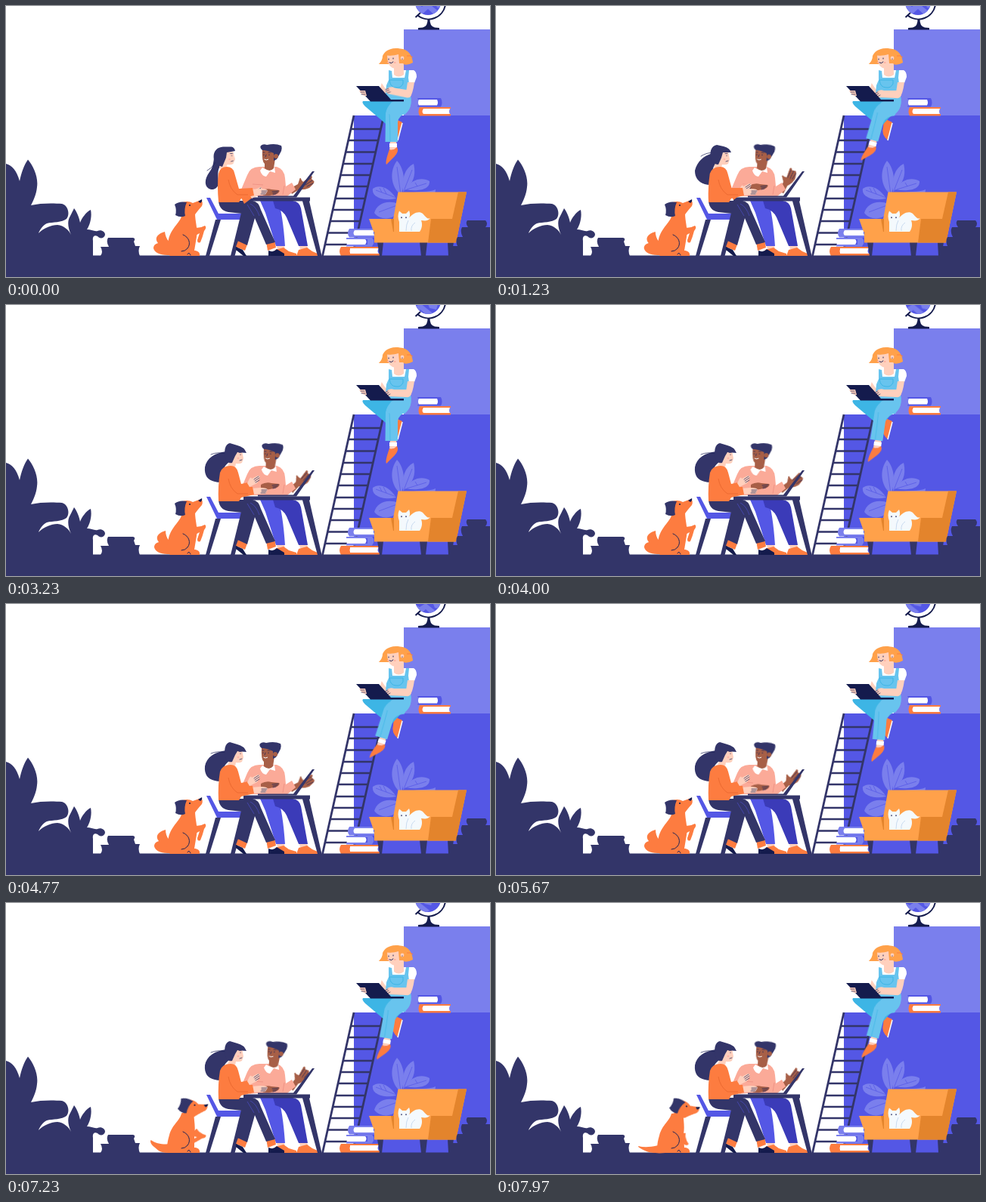
An HTML page for the animation above (8000 ms loop, 640 px wide and 359 px high).

```html
<!DOCTYPE html>
<html lang="en">
<head>
<meta charset="utf-8">
<title>Working together</title>
<style>
html, body { margin: 0; width: 100%; height: 100%; overflow: hidden; background: #fff; }
svg { display: block; width: 100%; height: 100%; }
.navy { fill: #333569; } .ink { fill: #141b4d; }
.blue { fill: #5457e5; } .lilac { fill: #7a7fed; } .indigo { fill: #3b3bb8; }
.orange { fill: #fd7c40; } .amber { fill: #ffa14a; } .rust { fill: #e3842c; }
.skin { fill: #ffd0bd; } .brown { fill: #a75f47; } .rose { fill: #fbaa98; }
.denim { fill: #68c4ee; } .deep { fill: #3db5e5; } .white { fill: #fff; }
.line { fill: none; stroke: #1d2358; stroke-width: 1; stroke-linecap: round; stroke-linejoin: round; }
.thin { stroke-width: .7; } .bold { stroke-width: 1.4; }
.move { animation: 8s ease-in-out infinite; }
#leg { transform-origin: 513px 133px; animation-name: leg; }
#typing { transform-origin: 535px 118px; animation-name: typing; }
#manHead { transform-origin: 346px 216px; animation-name: man-head; }
#collar { animation-name: collar; }
#wave { transform-origin: 378px 245px; animation-name: wave; }
#manHand { animation-name: man-hand; }
#ponytail { animation-name: ponytail; }
#crown { animation-name: crown; }
#womanFace { animation-name: woman-face; }
#strand { animation-name: strand; }
#sweater { animation-name: sweater; }
#gesture { animation-name: gesture; }
#dogHead { transform-origin: 236px 272px; animation-name: dog-head; }
#tail { animation-name: tail; }
#paw { transform-origin: 248px 300px; animation-name: paw; }
#dogBody { animation-name: dog-body; }
#continents { animation-name: spin; }

@keyframes leg {
  0%, 40.4% { transform: rotate(0deg); }
  20.2% { transform: rotate(17.6deg); }
  60% { transform: rotate(17deg); }
  77% { transform: rotate(0deg); }
  100% { transform: rotate(14.8deg); }
}
@keyframes typing {
  0% { transform: rotate(9deg); }
  5%, 100% { transform: none; }
}
@keyframes man-head {
  0% { transform: none; }
  15.4%, 25.4% { transform: translate(3px, 0) rotate(3deg); }
  40.4% { transform: translate(1.5px, 0) rotate(1deg); }
  59.6% { transform: translate(-1px, 0); }
  80.9% { transform: translate(7px, 0) rotate(5deg); }
  100% { transform: translate(4px, 0) rotate(3deg); }
}
@keyframes collar {
  0%, 59.6% { transform: none; }
  15.4%, 25.4% { transform: translate(3px, 0); }
  80.9% { transform: translate(6px, 0); }
  100% { transform: translate(4px, 0); }
}
@keyframes wave {
  0% { transform: none; }
  15.4%, 25.4% { transform: rotate(-32deg); }
  40.4% { transform: rotate(-15deg); }
  59.6% { transform: rotate(2deg); }
  80.9% { transform: rotate(-28deg); }
  100% { transform: rotate(-17deg); }
}
@keyframes man-hand {
  0% { transform: translate(0, 7px); }
  15.4% { transform: translate(-2px, 0); }
  25.4%, 62% { transform: none; }
  80%, 100% { transform: translate(0, 7px); }
}
@keyframes ponytail {
  0% { d: path("M278 193C273 203 276 211 269 220C263 228 262 237 267 241C272 245 279 243 281 236C281 226 278 217 285 210L292 195Z"); }
  15.4% { d: path("M286 195C274 199 266 206 263 218C263 227 267 233 276 236C284 238 292 237 290 230C285 223 285 215 291 208L298 194Z"); }
  22%, 100% { d: path("M291 194C276 196 265 203 263 215C262 226 267 232 276 234C284 236 291 235 290 229C286 222 286 215 295 208L302 193Z"); }
}
@keyframes crown {
  0% { d: path("M275 204C273 194 278 187 287 186.5L298 186.5Q302 187 303 192L292 194L291 201L286 213Q278 211 275 204Z"); }
  15.4% { d: path("M285 206C281 193 285 185 292 184L301 186Q309 188 311 194L300 194L298 201L294 210Q289 210 285 206Z"); }
  22%, 100% { d: path("M291 206C287 193 290 184 296 183L306 186Q315 188 318 196L306 195L303 200L299 209Q294 210 291 206Z"); }
}
@keyframes woman-face {
  0% { transform: translate(-11.5px, 0); }
  15.4% { transform: translate(-5px, 0); }
  22%, 100% { transform: none; }
}
@keyframes strand {
  0% { d: path("M279 203Q276 212 266 218"); }
  15.4% { d: path("M289 194Q278 194 271 199"); }
  22%, 100% { d: path("M291 197Q280 194 271 198"); }
}
@keyframes sweater {
  0% { d: path("M281 259Q279 239 281 222Q283 213 292 213Q300 213 302 221L308 242L326 241L328 251L311 255L308 260H281Z"); }
  20%, 100% { d: path("M281 259Q280 240 283 222Q286 213 297 213Q305 213 307 222L312 241L326 241L328 251L311 255L308 260H281Z"); }
}
@keyframes gesture {
  0% { transform: translate(3px, 14px); }
  15.4% { transform: translate(2px, 9px); }
  25.4%, 100% { transform: none; }
}
@keyframes dog-head {
  0%, 73% { transform: none; }
  80.9% { transform: translate(2px, 0) rotate(16deg); }
  100% { transform: translate(6px, 1px) rotate(29deg); }
}
@keyframes tail {
  0% { d: path("M224 329C207 332 197 328 195 321C195 316 199 315 201 314C195 307 202 301 210 299C211 308 216 316 226 318Z"); }
  25%, 73% { d: path("M224 329C207 332 198 328 196 321C196 316 200 315 202 314C196 307 203 301 211 299C211 308 216 316 226 318Z"); }
  80.9% { d: path("M224 329C212 332 206 330 203 326C201 323 200 321 198 319C193 313 193 308 195 306C201 316 214 319 226 318Z"); }
  100% { d: path("M224 331C214 332 204 331 199 329C196 328 193 326 191 325C189 324 188 323 188 322C200 325 214 322 226 317Z"); }
}
@keyframes paw {
  0%, 78% { transform: none; }
  82% { transform: rotate(12deg) translate(0, 2px); }
  100% { transform: rotate(82deg) translate(5px, 5px); }
}
@keyframes dog-body {
  0%, 73% { d: path("M233 276C230 288 219 293 215 309C212 319 212 328 217 331L256 331C257 326 253 324 249 324L252 306C254 296 250 286 250 274Z"); }
  100% { d: path("M232 279C229 290 220 293 216 308C213 318 212 327 215 331L256 331C257 326 253 324 249 324L248 306C250 294 247 286 248 277Z"); }
}
@keyframes spin {
  0%, 21% { transform: none; }
  40% { transform: translate(-10px, 2px); }
  60% { transform: translate(-3px, 3px); }
  81% { transform: translate(-30px, -4px); }
  100% { transform: translate(-3px, 2px); }
}
</style>
</head>
<body>
<svg viewBox="0 0 640 359" preserveAspectRatio="none">
  <defs>
    <clipPath id="sphere"><circle cx="558" cy="-5" r="17"/></clipPath>
  </defs>

  <!-- blocks -->
  <path class="lilac" d="M526 31H640V146H526Z"/>
  <path class="blue" d="M460 145H640V331H460Z"/>

  <!-- globe -->
  <circle class="blue" cx="558" cy="-5" r="17"/>
  <g clip-path="url(#sphere)"><path id="continents" class="move lilac" d="M541 -4L550 1L558 -4L577 11L570 15L558 4L549 12L543 8ZM566 -8L582 -7L579 4L570 2Z"/></g>
  <path fill="none" stroke="#141b4d" stroke-width="2" d="M541.500 15L548 9M544 12A22.500 22.500 0 0 0 581 -2"/>
  <path class="ink" d="M557.500 17H560.500Q560 27 567 28.500L573 29V31.500H545V29L551 28.500Q558 27 557.500 17Z"/>

  <!-- books on the block -->
  <path class="blue" d="M544 122H575Q578 128 575 133.500H544L545 131.500H570V124H545Z"/>
  <path class="white" d="M546 124H570Q572 128 570 131.500H546Q544 128 546 124Z"/>
  <path class="orange" d="M547 134H588V136H558V143H588V145.500H547Q544 140 547 134Z"/>
  <path class="white" d="M552 136H587Q585 140 587 143H552Q549 140 552 136Z"/>

  <!-- leafy plant -->
  <g class="lilac">
    <path d="M522 250C508 239 507 218 517 205C528 217 528 237 522 250Z"/>
    <path d="M525 246C523 229 527 215 539 209C543 226 537 237 525 246Z"/>
    <path d="M528 243C535 230 550 226 560 232C561 244 543 246 528 243Z"/>
    <path d="M516 255C506 239 492 236 485 242C483 253 499 259 516 255Z"/>
    <path d="M519 262C503 256 490 263 487 274C494 284 512 284 518 273Z"/>
    <path d="M530 249C545 244 558 248 568 243L566 260H530Z"/>
  </g>
  <path fill="none" stroke="#5457e5" stroke-width=".7" d="M517 213L522 250M537 217L526 245M556 235L530 243M489 244L516 254M493 273L517 264M494 241l3 6M499 241l4 8M541 234l3 5"/>

  <!-- ladder -->
  <path fill="none" stroke="#333569" stroke-width="2.800" d="M460 145L418.500 331M498 152L458 331"/>
  <path fill="none" stroke="#333569" stroke-width="2.300" d="M456 163H495M453 178H492M449 193.500H489M446 209H485M442 224H482M439 239H478M435 255H475M432 270H471M428 285H468M425 300.500H464M421 316H461"/>

  <!-- books on the floor -->
  <path class="lilac" d="M454 295H488V297H464V304H488V306.500H454Q450 301 454 295ZM450 307H484Q489 312 484 318.500H450V316H478V309H450Z"/>
  <path class="white" d="M461 297H487Q485 300 487 304H461Q458 301 461 297ZM451 309H475Q478 312 475 316H451Q449 312 451 309Z"/>
  <path class="orange" d="M443 319H494V321H455V328H494V331H443Q439 325 443 319Z"/>
  <path class="white" d="M456 321H493Q490 325 493 328H456Q453 325 456 321Z"/>

  <!-- armchair and cat -->
  <path class="navy" d="M491 313H499L497 331H494ZM547 313H557L555 331H549ZM584 313H592L589 331H585Z"/>
  <path class="amber" d="M518.500 246.500H609L595 313.500H487V299H509Z"/>
  <path class="rust" d="M609 246.500L595 313.500H558L562 282H590L598 246.500ZM509 282L513 282L513 299H507Z"/>
  <path class="amber" d="M480 282H509L512 299H486Z"/>
  <path fill="#f4f9fd" d="M520 271.500L524 275H529L533 271C535 276 534 280 532 282C538 274 546 271 551 275C555 279 557 283 561 281C557 286 552 284 549 284C551 289 550 295 547 299H520V286C518 281 518 276 520 271.500Z"/>
  <path fill="none" stroke="#c9dbf0" d="M532 284Q529 289 529 298M541 287Q535 291 536 298"/>
  <path class="line bold" d="M523 280v.5M529 280v.5"/>

  <!-- girl on the block -->
  <path class="orange" d="M513 149L524 154L518 178Q509 170 512 161Z"/>
  <path d="M524 155L518 178" stroke="#fff" stroke-width="1.500"/>
  <path class="skin" d="M498 98L506 98L503 118H492Z"/>
  <path class="white" d="M504 85L513 86L526 85L539 85Q543 87 543 94L540 102L531 101L530 110H502L496 101Z"/>
  <path class="skin" d="M513 76H526V91Q519 96 513 91Z"/>
  <path class="denim" d="M506 85L510 86L511 95H527L529 85H533L532 95L535 119C537 131 534 138 527 144L500 135L503 105L506 98Z"/>
  <path class="deep" d="M472 126H526L530 137L508 161L475 133Q470 128 472 126Z"/>
  <path fill="none" stroke="#3db5e5" d="M507 98H525V103Q522 109 516 108Q508 108 507 98"/>
  <g id="leg" class="move">
    <path class="skin" d="M508 178H516L517 189L507 192Z"/>
    <path class="white" d="M507 182H517V187H507Z"/>
    <path class="orange" d="M507 190Q512 192 517 187Q520 192 514 199L503 210Q501 207 507 190Z"/>
    <path class="denim" d="M502 142Q505 127 520 124L530 125L530 141Q519 145 518 154V180H501.500Z"/>
    <path d="M507 143Q508 159 508 180" fill="none" stroke="#3db5e5" stroke-width=".7"/>
  </g>
  <path class="denim" d="M509 128Q521 120 535 119C537 132 534 143 520 145H508Q504 138 509 128Z"/>
  <path class="skin" d="M531 101H540Q538 116 534 121L528 121Z"/>
  <g id="typing" class="move">
    <path class="skin" d="M536 117Q535 123 529 122L505 121Q499 118 503 114Q507 110 513 112L530 112Z"/>
    <path class="line thin" d="M501 116l4-2M502 118l4-2M504 120l4-2"/>
  </g>
  <path class="ink" d="M463 106H493L509 124H526V126.500H482Z"/>
  <path class="skin" d="M467 112L475 112L477 119Q471 120 467 112Z"/>
  <path class="line thin" d="M469 114h5M470 117h5"/>
  <path class="amber" d="M493 77Q498 72 498 66C502 57 512 55 521 56.500C532 57 537 65 538 75Q531 79 525 77H502Q498 77 493 77Z"/>
  <path class="skin" d="M504 65Q514 66 521 62Q526 67 526 75Q525 83 515 83Q504 82 504 65Z"/>
  <path class="amber" d="M499 65Q511 57 527 60L531 76L520 76L519 64Q510 67 499 65Z"/>
  <circle class="skin" cx="524" cy="69" r="2.400"/>
  <path fill="none" stroke="#fd7c40" d="M530 66q5-1 8 2"/>
  <path class="line" d="M506 70v1M512 69v1M507 75Q510 77 512 74M524 70v.3"/>
  <path d="M504 75l2-.5M513 75h2.500" stroke="#ffa99d" stroke-width="1.500"/>

  <!-- ground and silhouettes -->
  <path class="navy" d="M0 209C8 211 14 218 18 232C20 222 24 210 29 203.500C36 212 43 226 41 240C40 250 36 258 33 264C45 261 62 261 74 262C82 264 85 276 80 282C74 287 62 286 54 288C49 290 45 296 43 301C50 294 60 290 68 290C77 291 83 297 86 303C82 294 81 286 84 280C87 274 89 270 90 268C94 273 97 281 98 287C100 281 106 273 112 270C114 279 111 290 107 296C112 296 117 299 121 298C126 296 131 299 131 303C130 308 124 309 121 305C117 303 114 305 115 311V330.500H640V359H0Z"/>
  <path class="navy" d="M135 307H168Q172 308 169 312L171 318H177Q174 324 177 331H125Q129 326 125 319H136Q132 312 135 307Z"/>
  <path class="navy" d="M610 284H634Q638 288 634 293H640V331H585Q588 324 585 318H597Q594 311 597 306H604Q600 299 603 293H611Q607 288 610 284Z"/>

  <!-- dog -->
  <path id="tail" class="move orange" d="M224 329C207 332 197 328 195 321C195 316 199 315 201 314C195 307 202 301 210 299C211 308 216 316 226 318Z"/>
  <path id="paw" class="move orange" d="M248 293Q256 295 263 291Q266 293 262 298Q260 306 257 313Q253 315 253 310L256 301L247 306Z"/>
  <path id="dogBody" class="move orange" d="M233 276C230 288 219 293 215 309C212 319 212 328 217 331L256 331C257 326 253 324 249 324L252 306C254 296 250 286 250 274Z"/>
  <path class="line" d="M234 303C242 306 245 315 240 321Q237 325 232 325M240 329q2-4 4 1"/>
  <g id="dogHead" class="move">
    <path class="orange" d="M231 261Q240 257 247 261L258 257Q261 260 259 265Q252 273 248 279L233 281Z"/>
    <path class="navy" d="M223 263Q229 258 239 260Q235 269 237 278Q231 281 224 277Q226 270 223 263Z"/>
    <path class="ink" d="M254 259L259 256Q260 259 257 261Z"/>
    <circle class="ink" cx="243" cy="264" r="1.100"/>
  </g>

  <!-- chair -->
  <path class="navy" d="M277 283H284L269 331H264Z"/>
  <path class="blue" d="M265 254H270L281 275H313V283H279Z"/>

  <!-- man -->
  <path class="blue" d="M336 258H360Q366 276 369 318H357L343 274Z"/>
  <path class="indigo" d="M353 258H379Q388 259 390 268L399 318H387L371 280Q366 270 356 268Z"/>
  <path class="skin" d="M358 318H368L369 322H359ZM388 318H398L400 322H389Z"/>
  <path class="orange" d="M356 323L367 320L374 325L384 328V331H354ZM387 323L398 320L405 325L412 328V331H384Z"/>
  <g id="wave" class="move">
    <path class="brown" d="M375 242L386 236L388 230Q389 225 391 231L393 233L403 225Q406 225 404 229L406 231Q409 232 406 236L401 241Q394 244 388 243L378 249Z"/>
    <path class="line thin" d="M394 234L403 228M396 237L405 231M398 239L406 235"/>
  </g>
  <path class="rose" d="M319 224Q323 213 335 213H358Q368 216 369 228L370 239L378 234L383 243L372 252H322L311 243Z"/>
  <path fill="none" stroke="#ed8f82" stroke-width=".8" d="M368 238L366 250M326 236L340 237"/>
  <path id="collar" class="move white" d="M339 214Q346 220 355 213L356 221L349 219L344 226Q338 225 336 218Z"/>
  <g id="manHead" class="move">
    <path class="brown" d="M339 190Q347 186 357 190L356 202L354 215Q349 221 342 215L342 209Q338 206 339 190Z"/>
    <path class="navy" d="M337 185Q340 182 345 184Q356 181.500 364 185Q366 190 362 196L358 203L354 205L354 195Q346 191 339 191Q335 188 337 185Z"/>
    <circle class="brown" cx="357" cy="199" r="3"/>
    <path class="line" d="M341 197v.5M348 197v.5"/>
    <path class="line thin" d="M340 194h2M347 194h3M344 197l-1 3"/>
    <path d="M341.500 203Q344 205 347 203" stroke="#fff" fill="none"/>
  </g>
  <g id="manHand" class="move">
    <path class="rose" d="M318 236L338 236L341 244L322 246Z"/>
    <path class="brown" d="M337 238Q344 234 351 236L361 237Q363 239 358 242L349 244Q341 245 337 242Z"/>
    <path class="line thin" d="M352 239l8-1M353 241l6-1M353 243l4-1"/>
  </g>

  <!-- table and laptop -->
  <path class="navy" d="M314 253.500H402V258.500H401L417.500 331H412L392 258.500H323L302.500 331H297L314 262Z"/>
  <path class="navy" d="M333 251.500H380L405 219H408L384 253.500H333Z"/>

  <!-- woman -->
  <path class="orange" d="M307 311L319 316L316 324L304 319ZM344 312L355 310L357 320L346 324Z"/>
  <path class="ink" d="M304 319L313 323L318 331H314L304 323ZM347 324Q354 327 358 322L368 328V331H347Z"/>
  <path class="navy" d="M281 258H326Q334 259 337 270L356 313L344 316L329 281L319 317L306 311L312 275L294 273Q282 271 281 258Z"/>
  <path d="M319 263L328 278M323 262Q331 266 335 278" fill="none" stroke="#5457e5" stroke-width=".5"/>
  <path id="ponytail" class="move navy" d="M278 193C273 203 276 211 269 220C263 228 262 237 267 241C272 245 279 243 281 236C281 226 278 217 285 210L292 195Z"/>
  <path id="strand" class="move line thin" d="M279 203Q276 212 266 218"/>
  <g id="gesture" class="move">
    <path class="orange" d="M307 238L320 235L324 239L312 248Z"/>
    <path class="skin" d="M319 236L322 230Q324 227 325 230L333 226Q337 226 335 230L332 236L322 241Z"/>
    <path class="line thin" d="M328 231l6-4M329 233l6-4M330 235l5-3"/>
  </g>
  <path class="skin" d="M325 243L336 242Q346 242 346 245L343 250L326 251Z"/>
  <path class="line thin" d="M338 245h7M338 247h6M337 249h6"/>
  <g id="womanFace" class="move">
    <path class="skin" d="M300 193H312L314 203L312 209Q309 211 304 210L303 215Q297 218 293 214L296 205Z"/>
    <circle class="skin" cx="299" cy="201" r="2.600"/>
    <path class="line thin" d="M310 198v.7M308 195.500h3M309 206l3-1"/>
    <circle cx="307" cy="203" r="1.300" fill="#ffb5a8"/>
  </g>
  <path id="sweater" class="move orange" d="M281 259Q279 239 281 222Q283 213 292 213Q300 213 302 221L308 242L326 241L328 251L311 255L308 260H281Z"/>
  <path fill="none" stroke="#df5e29" stroke-width=".6" d="M294 230Q296 243 306 250L320 250"/>
  <path id="crown" class="move navy" d="M275 204C273 194 278 187 287 186.500L298 186.500Q302 187 303 192L292 194L291 201L286 213Q278 211 275 204Z"/>
</svg>
</body>
</html>
```
